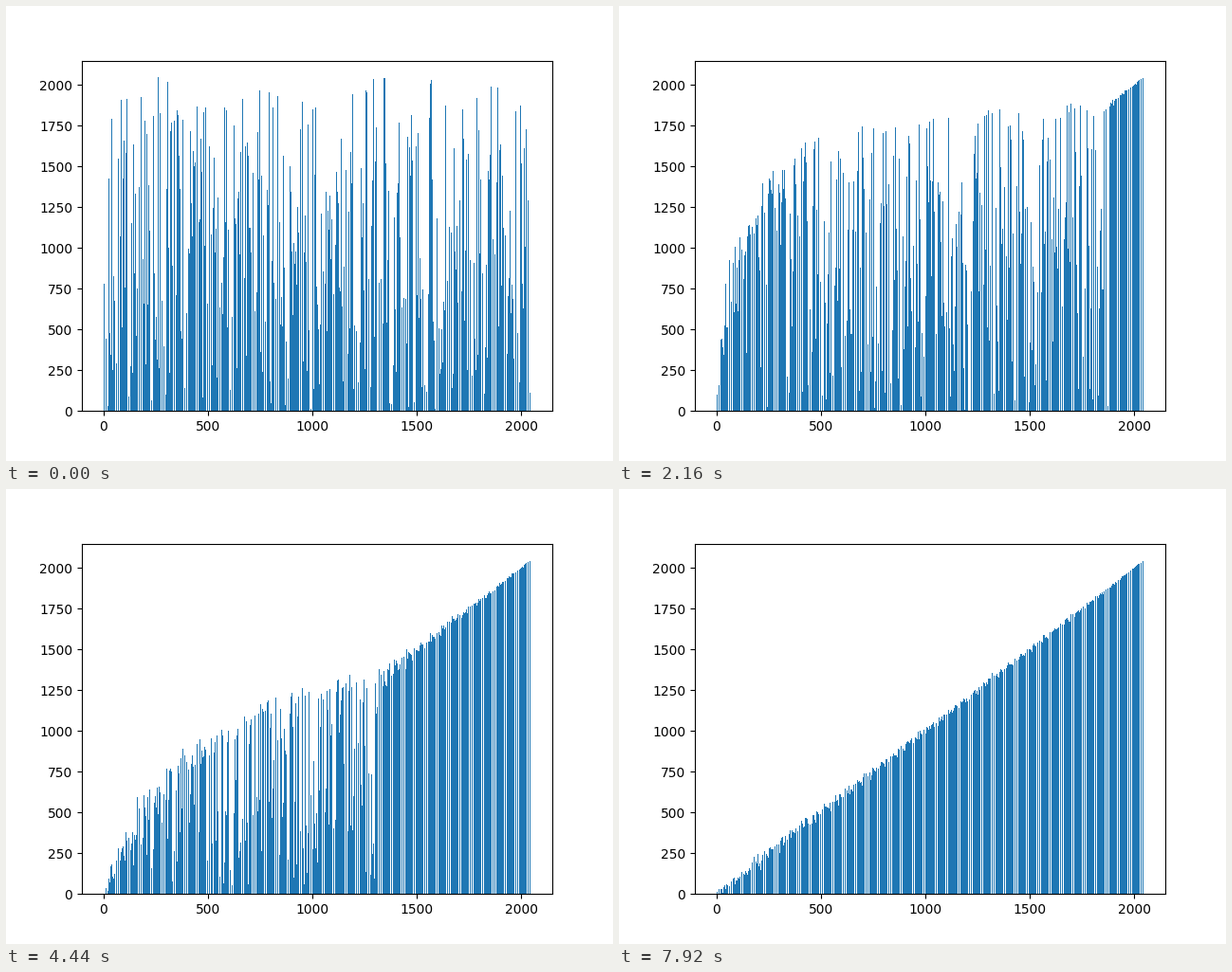
Recreate the animation shown at these times as a matplotlib script. Size 640 by 480 pixels, loop 8 s.

```python
import numpy as np
import matplotlib.pyplot as plt
from matplotlib.animation import FuncAnimation
from matplotlib.collections import PolyCollection

N = 2048
STEPS = 67
MAX_GAP = 64
HALF = 0.4                      # half the width of a bar
FRAMES, INTERVAL = 200, 40      # three frames to a sorting step

SPAN = N - 1 + 2 * HALF
LEFT, RIGHT = -HALF - 0.05 * SPAN, N - 1 + HALF + 0.05 * SPAN
TOP = 1.05 * (N - 1)


def sort_pass(a, gap):
    """One bubble pass that compares values a gap apart."""
    for i in range(N - gap):
        if a[i] > a[i + gap]:
            a[i], a[i + gap] = a[i + gap], a[i]


def history():
    """Values after every pass, the gap growing by one and then restarting."""
    a = np.random.default_rng(12).permutation(N).tolist()
    states = [np.array(a)]
    for step in range(STEPS - 1):
        sort_pass(a, step % MAX_GAP + 1)
        states.append(np.array(a))
    return states


fig, ax = plt.subplots(figsize=(6.4, 4.8), dpi=100)
ax.set_xlim(LEFT, RIGHT)
ax.set_ylim(0, TOP)


def column(x):
    """Pixel column that a data x snaps to."""
    points = np.column_stack([x, np.zeros(N)])
    return np.floor(ax.transData.transform(points)[:, 0] + 0.5)


# Bars whose two edges snap to one column have no width and never show
index = np.arange(N)
shown = index[column(index + HALF) > column(index - HALF)]
states = history()

corners = np.zeros((len(shown), 4, 2))
corners[:, :, 0] = shown[:, None] + HALF * np.array([-1, 1, 1, -1])
bars = PolyCollection(corners, facecolor="C0", edgecolor="none",
                      linewidth=0, snap=True)
ax.add_collection(bars, autolim=False)


def draw(frame):
    step = frame * STEPS // (FRAMES + 1)
    corners[:, 2:, 1] = states[step][shown][:, None]
    bars.set_verts(corners)
    return [bars]


anim = FuncAnimation(fig, draw, frames=FRAMES, interval=INTERVAL,
                     repeat=True, repeat_delay=0)
plt.show()
```
